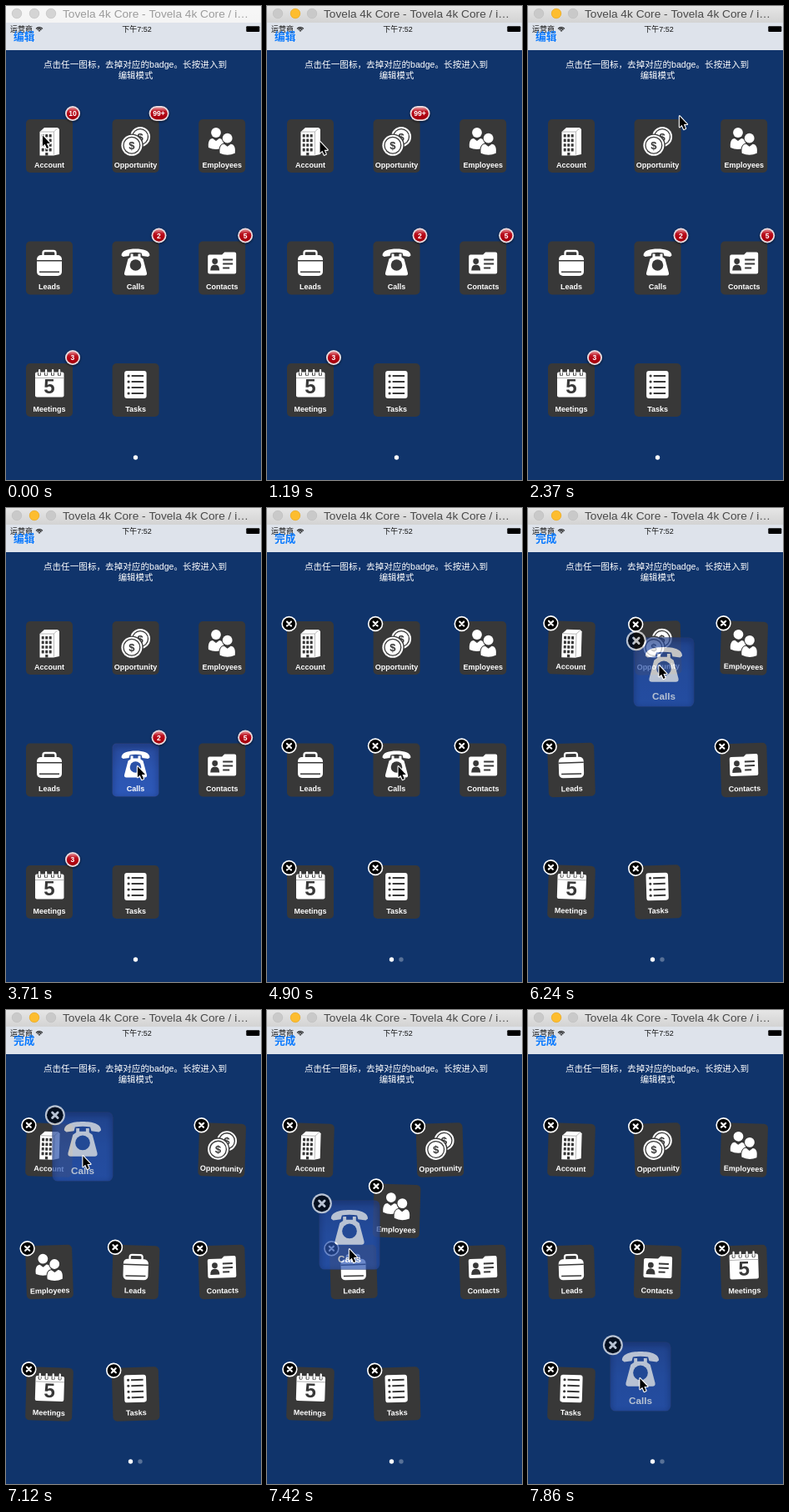
Write an HTML page with a canvas that moves like this. It is 306 px wide and 569 px high and loops after 8000 ms.

```html
<!DOCTYPE html>
<html lang="zh-CN">
<head>
<meta charset="utf-8">
<title>Badge grid</title>
<style>
html, body { margin: 0; width: 100%; height: 100%; overflow: hidden; background: #10346b; }
canvas { display: block; width: 306px; height: 569px; }
</style>
</head>
<body>
<canvas id="stage"></canvas>
<script>
const W = 306, H = 569, LOOP = 8000, STEPS = 54;
const BG = '#10346b', TILE = '#383838', BLUE = '#2b52a8';
const SANS = '"Liberation Sans", "Noto Sans CJK SC", "Noto Sans CJK", sans-serif';
const DEVICE = 'Tovela 4k Core';
const dpr = window.devicePixelRatio || 1;

function surface(canvas) {
  canvas.width = W * dpr;
  canvas.height = H * dpr;
  const c = canvas.getContext('2d');
  c.scale(dpr, dpr);
  return c;
}
const page = surface(document.getElementById('stage'));
const layer = surface(document.createElement('canvas'));
let ctx = page;

const clamp = v => Math.max(0, Math.min(1, v));
const mix = (a, b, k) => a + (b - a) * k;
const ease = k => k * k * (3 - 2 * k);
const ramp = (t, a, b) => ease(clamp((t - a) / (b - a)));

// Times below are in screen refreshes: the picture updates 54 times per loop.
const cursorPath = [
  [0, 43, 154], [6, 43, 167], [7, 43, 167], [14, 181, 131], [16, 181, 131],
  [23, 157, 309], [32, 157, 309], [37, 155.5, 309], [39, 155.5, 309],
  [42, 156.5, 188], [45, 124, 155], [48, 91.5, 174], [50, 98, 286], [53, 133.5, 441]
];
const dragPath = [
  [39, 155.5, 314.5], [42, 163, 197], [45, 130, 148], [48, 92, 164],
  [50, 99, 270], [53, 135, 440]
];
// When the lifted tile takes a new place in the grid.
const moves = [[0, 4], [43, 1], [49, 4], [51, 7]];
const MOVE_TIME = 2;

function along(path, t) {
  let i = 0;
  while (i < path.length - 2 && t >= path[i + 1][0]) i++;
  const [ta, xa, ya] = path[i], [tb, xb, yb] = path[i + 1];
  const k = clamp((t - ta) / (tb - ta));
  return [mix(xa, xb, k), mix(ya, yb, k)];
}

const slot = i => [52 + 103.6 * (i % 3), 168 + 146.5 * Math.floor(i / 3)];

function rect(x, y, w, h, r, fill) {
  ctx.beginPath();
  ctx.roundRect(x, y, w, h, r);
  ctx.fillStyle = fill;
  ctx.fill();
}
function disc(x, y, r, fill) {
  ctx.beginPath();
  ctx.arc(x, y, r, 0, Math.PI * 2);
  ctx.fillStyle = fill;
  ctx.fill();
}
function ring(x, y, r, width, color) {
  ctx.beginPath();
  ctx.arc(x, y, r, 0, Math.PI * 2);
  ctx.lineWidth = width;
  ctx.strokeStyle = color;
  ctx.stroke();
}
function shape(d, fill, line, width) {
  const p = new Path2D(d);
  if (line) {
    ctx.strokeStyle = line;
    ctx.lineWidth = width;
    ctx.lineJoin = 'round';
    ctx.stroke(p);
  }
  if (fill) {
    ctx.fillStyle = fill;
    ctx.fill(p);
  }
}
function text(s, x, y, size, fill, align = 'center', weight = '') {
  ctx.font = `${weight} ${size}px ${SANS}`;
  ctx.textAlign = align;
  ctx.fillStyle = fill;
  ctx.fillText(s, x, y);
}
function gradient(y0, y1, ...stops) {
  const g = ctx.createLinearGradient(0, y0, 0, y1);
  stops.forEach((c, i) => g.addColorStop(i / (stops.length - 1), c));
  return g;
}

// Each glyph is drawn around the tile centre; "ink" is the tile colour.
const glyphs = {
  Account(ink) {
    shape('M-11.5 -17L-6 -22H10L12 -20V10L5 11.5H-11.5Z', '#fff');
    for (let r = 0; r < 4; r++)
      for (let c = 0; c < 3; c++) rect(-9.3 + c * 4.5, -14 + r * 5.6, 3, 3.6, 0.3, ink);
    rect(-4.8, 8, 3.2, 3.5, 0, ink);
    shape('M5.5 -17V10.5M-11 -17H5.5L10 -21.5', null, '#9a9a9a', 0.7);
  },
  Opportunity(ink) {
    const coin = (x, y, r) => {
      disc(x, y, r + 1.4, ink);
      disc(x, y, r, '#fff');
      ring(x, y, r - 2.6, 1.3, ink);
      text('$', x, y + 4.7, 13, ink, 'center', 'bold');
    };
    coin(5.5, -11, 12);
    coin(-4.7, -0.7, 12.5);
  },
  Employees(ink) {
    const person = (x, y) => {
      const body = `M${x - 9} ${y + 18}C${x - 10} ${y + 10} ${x - 7} ${y + 7} ${x - 4} ${y + 7}` +
        `L${x} ${y + 10}L${x + 4} ${y + 7}C${x + 8} ${y + 7} ${x + 10} ${y + 11} ${x + 9} ${y + 18}` +
        `Q${x} ${y + 22} ${x - 9} ${y + 18}Z`;
      shape(body, '#fff', ink, 2);
      disc(x, y, 6.9, ink);
      disc(x, y, 5.9, '#fff');
    };
    person(-7.2, -16);
    person(6.5, -9.3);
  },
  Leads(ink) {
    shape('M-7.5 -15V-18Q-7.5 -20.5 -5 -20.5H5Q7.5 -20.5 7.5 -18V-15', null, '#fff', 2.3);
    rect(-15, -15.5, 30, 25, 5, '#fff');
    rect(-15, -9.5, 30, 1.5, 0, ink);
    rect(-12, 4, 24, 1.5, 0, ink);
  },
  Calls(ink) {
    shape('M-17 -15C-17 -21 -9 -23 0 -23C9 -23 17 -21 17 -15L15 -13.5L8 -14.5L7 -18' +
      'Q0 -19.5 -7 -18L-8 -14.5L-15 -13.5Z', '#fff');
    shape('M-6 -17H-3V-14H3V-17H6V-13L9 -11L13.5 6Q14 9 11 9H-11Q-14 9 -13.5 6L-9 -11L-6 -13Z', '#fff');
    disc(0, -3.5, 6.8, ink);
  },
  Contacts(ink) {
    shape('M-15 -16H0L3 -19H15Q17 -19 17 -17V5Q17 7 15 7H-15Q-17 7 -17 5V-14Q-17 -16 -15 -16Z', '#fff');
    disc(-8.5, -8, 3.4, ink);
    shape('M-14 3Q-14 -4 -8.5 -4Q-3 -4 -3 3Z', ink);
    rect(1, -11, 12, 2, 0, ink);
    rect(1, -6, 12, 2, 0, ink);
    rect(1, -1, 8, 2, 0, ink);
  },
  Meetings(ink) {
    rect(-17, -21.5, 34.5, 30, 2, '#fff');
    rect(-17, -15, 34.5, 0.8, 0, '#999');
    for (const x of [-12, -4, 4, 12]) {
      rect(x - 2, -21.5, 4, 4.5, 1.5, ink);
      rect(x - 1, -25, 2.2, 7.5, 1, '#fff');
    }
    text('5', 0, 4, 24, ink, 'center', 'bold');
  },
  Tasks(ink) {
    rect(-13.5, -23, 26.5, 33, 3, '#fff');
    for (let r = 0; r < 4; r++) {
      const y = -17 + r * 7;
      disc(-8.5, y, 1.6, ink);
      rect(-5, y - 1, 14.5, 2, 0, ink);
    }
  }
};
const names = Object.keys(glyphs);
const others = names.filter(n => n !== 'Calls');
const badges = { Account: '10', Opportunity: '99+', Calls: '2', Contacts: '5', Meetings: '3' };
const badgeEnd = { Account: 4, Opportunity: 16 };
const EDIT = 32;

function closeButton() {
  disc(-25.5, -29, 9.2, '#fff');
  disc(-25.5, -29, 7.6, '#000');
  ctx.lineCap = 'round';
  shape('M-28 -31.5L-23 -26.5M-23 -31.5L-28 -26.5', null, '#fff', 2.2);
  ctx.lineCap = 'butt';
}

function badge(label) {
  const w = label.length > 2 ? 24 : 18;
  ctx.save();
  ctx.shadowColor = 'rgba(0,0,0,.6)';
  ctx.shadowBlur = 3 * dpr;
  ctx.shadowOffsetY = dpr;
  rect(28 - w / 2, -48, w, 18, 9, '#e9dde2');
  ctx.restore();
  rect(29.8 - w / 2, -46.2, w - 3.6, 14.4, 7.2, gradient(-46, -32, '#e58d93', '#bb1220', '#b00010', '#a2000c'));
  text(label, 28, -35.8, 8.6, '#fff', 'center', 'bold');
}

// Blue face of a held tile, sunk in with a shadow along its inner edge.
function pressedFace() {
  ctx.save();
  rect(-28, -32, 56, 64, 5, gradient(-32, 32, '#284a9a', '#2c55b0', '#2d58b8'));
  ctx.clip();
  ctx.shadowColor = 'rgba(10,22,64,.9)';
  ctx.shadowBlur = 7 * dpr;
  ctx.shadowOffsetY = 2.5 * dpr;
  ctx.beginPath();
  ctx.roundRect(-29, -33, 58, 66, 6);
  ctx.lineWidth = 2;
  ctx.strokeStyle = '#1d3570';
  ctx.stroke();
  ctx.restore();
}

function tile(name, x, y, { angle = 0, scale = 1, press = 0, edit = false, label } = {}) {
  ctx.save();
  ctx.translate(x, y);
  ctx.rotate(angle);
  ctx.scale(scale, scale);
  rect(-28, -32, 56, 64, 5, TILE);
  ctx.globalAlpha = press;
  if (press) pressedFace();
  ctx.globalAlpha = 1;
  glyphs[name](press > 0.5 ? BLUE : TILE);
  text(name, 0, 25.5, 9, '#fff', 'center', 'bold');
  if (edit) closeButton();
  else if (label) badge(label);
  ctx.restore();
}

// Paint as one group, so overlapping parts fade together.
function faded(alpha, paint) {
  layer.clearRect(0, 0, W, H);
  ctx = layer;
  paint();
  ctx = page;
  ctx.globalAlpha = alpha;
  ctx.drawImage(layer.canvas, 0, 0, W, H);
  ctx.globalAlpha = 1;
}

function chrome(t) {
  const active = t >= 1, edit = t >= EDIT;
  rect(0, 20, W, 33, 0, '#dee3eb');
  rect(0, 0, W, 20, 0, active ? gradient(0, 20, '#e6e6e6', '#d3d3d3') : gradient(0, 20, '#f7f7f7', '#f4f4f4'));
  [13, 34, 54].forEach((x, i) => {
    const lit = active && i === 1;
    disc(x, 9, 6, lit ? '#fdbd2f' : active ? '#c9c9c9' : '#d4d4d4');
    ring(x, 9, 5.8, 0.5, lit ? '#dfa023' : '#bdbdbd');
  });
  text(`${DEVICE} - ${DEVICE} / i…`, 68, 13.6, 13.7, active ? '#4a4a4a' : '#9c9c9c', 'left');

  text('运营商', 5, 31, 9, '#111', 'left');
  text('下午7:52', 157, 31, 9, '#111');
  for (const r of [2, 4, 6]) {
    ctx.beginPath();
    ctx.arc(40, 31, r - 0.6, -Math.PI * 0.76, -Math.PI * 0.24);
    ctx.lineWidth = 1.2;
    ctx.strokeStyle = '#111';
    ctx.stroke();
  }
  rect(288.3, 24.3, 16, 6.6, 1, '#000');
  text(edit ? '完成' : '编辑', 9, 41.3, 12.7, '#0a7aff', 'left', 'bold');

  text('点击任一图标，去掉对应的badge。长按进入到', 155, 74, 10.6, '#fff');
  text('编辑模式', 155.5, 87, 10.4, '#fff');
  if (edit) {
    disc(149.5, 542, 2.7, '#fff');
    disc(161, 542, 2.7, 'rgba(255,255,255,.3)');
  } else disc(155.5, 542, 2.7, '#fff');
}

function cursor(t) {
  const [x, y] = along(cursorPath, t);
  ctx.save();
  ctx.translate(x, y);
  shape('M0.9 1.2V14.3L3.7 11.8L6 17L8.1 16L5.9 11H10Z', '#000', '#fff', 2.2);
  ctx.restore();
}

function draw(t) {
  rect(0, 0, W, H, 0, BG);
  chrome(t);

  const edit = t >= EDIT, wiggle = t >= 38 ? 0.03 : 0;
  let m = moves.length - 1;
  while (t < moves[m][0]) m--;
  const to = moves[m][1], from = m ? moves[m - 1][1] : to;
  const k = m ? ramp(t, moves[m][0], moves[m][0] + MOVE_TIME) : 1;
  const place = (i, gap) => i < gap ? i : i + 1;

  others.forEach((name, i) => {
    const a = slot(place(i, from)), b = slot(place(i, to));
    const angle = place(i, to) % 2 ? -wiggle : wiggle;
    const label = t < (badgeEnd[name] || EDIT) ? badges[name] : '';
    tile(name, mix(a[0], b[0], k), mix(a[1], b[1], k), { angle, edit, label });
  });

  const lift = ramp(t, 37, 40);
  const press = edit ? lift : clamp((t - 23) / 2);
  const [x, y] = along(dragPath, t);
  faded(1 - 0.3 * lift, () =>
    tile('Calls', x, y, { scale: 1 + 0.3 * lift, press, edit, label: badges.Calls }));
  cursor(t);
}

function tick() {
  draw(Math.floor((performance.now() % LOOP) / LOOP * STEPS));
  requestAnimationFrame(tick);
}
tick();
</script>
</body>
</html>
```
